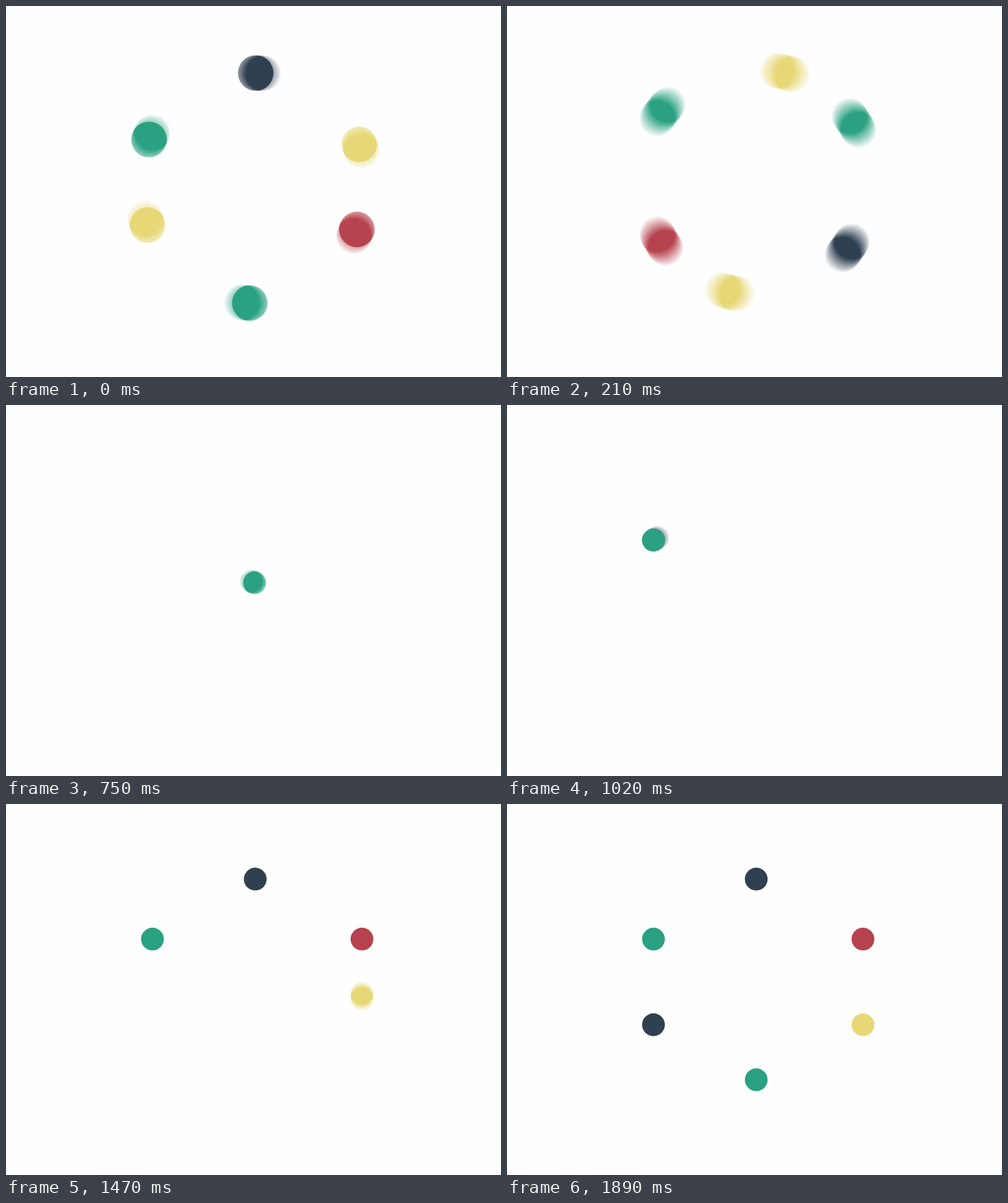
Write an HTML page with a canvas that moves like this. It is 800 by 600 pixels and loops after 3.12 s.

```html
<!DOCTYPE html>
<html lang="en">
<head>
<meta charset="utf-8">
<title>Orbiting dots</title>
<style>
  html, body { margin: 0; width: 100%; height: 100%; overflow: hidden; background: #fefefe; }
  canvas { display: block; }
</style>
</head>
<body>
<canvas id="stage" width="800" height="600"></canvas>
<script>
const W = 800, H = 600;
const FRAME_MS = 30, FRAMES = 104;
const SAMPLES = 16, SHUTTER = 0.5; // motion blur, shutter centred on the frame

const NAVY = '#2f4051', GREEN = '#2aa181', YELLOW = '#e7d877', RED = '#b6434e';

const ctx = document.getElementById('stage').getContext('2d');
const layer = document.createElement('canvas');
layer.width = W;
layer.height = H;
const lctx = layer.getContext('2d');

// Ring of large dots: resting places after the spin, topmost first
const PIVOT = [403.2, 288.2], SPIN = 179 * Math.PI / 180;
const SPIN_END = 10, MERGE_START = 15, MERGE_END = 20;
const BIG = 28.7, SMALL = 18.4;
const ring = [
  [GREEN, 576.5, 357.5],
  [NAVY, 406, 468],
  [YELLOW, 236.5, 355.5],
  [RED, 238, 218],
  [GREEN, 409, 95.7],
  [YELLOW, 576.5, 219]
];

// Chain of small dots: each leaves the place where the one before stopped
const CENTER = [401.9, 287.4];
const stops = [CENTER, [236.7, 218.4], [402.8, 121.4], [575.3, 218.4],
  [575.3, 357], [402.8, 446], [236.7, 357]];
const chain = [
  [GREEN, 25, 31],
  [NAVY, 34, 39],
  [RED, 39, 45],
  [YELLOW, 45, 51],
  [GREEN, 51, 57],
  [NAVY, 57, 62]
];

const mix = (a, b, p) => a + (b - a) * p;
const progress = (t, from, to) => Math.min(1, Math.max(0, (t - from) / (to - from)));

function ringPose(x, y, t) {
  const a = SPIN * (progress(t, 0, SPIN_END) - 1);
  const dx = x - PIVOT[0], dy = y - PIVOT[1];
  const px = PIVOT[0] + dx * Math.cos(a) - dy * Math.sin(a);
  const py = PIVOT[1] + dx * Math.sin(a) + dy * Math.cos(a);
  const m = progress(t, MERGE_START, MERGE_END);
  return [mix(px, CENTER[0], m), mix(py, CENTER[1], m), mix(BIG, SMALL, m)];
}

function chainPose(i, t) {
  const [, from, to] = chain[i];
  const p = progress(t, from, to);
  const a = stops[i], b = stops[i + 1];
  return [mix(a[0], b[0], p), mix(a[1], b[1], p), SMALL];
}

function disc(c, [x, y, r]) {
  c.beginPath();
  c.arc(x, y, r, 0, Math.PI * 2);
  c.fill();
}

function drawDot(color, frame, poseAt) {
  const poses = Array.from({ length: SAMPLES },
    (_, i) => poseAt(frame + SHUTTER * (i / SAMPLES - 0.5)));
  const [first, last] = [poses[0], poses[SAMPLES - 1]];
  if (first.every((v, i) => v === last[i])) {
    ctx.fillStyle = color;
    disc(ctx, first);
    return;
  }
  // Add up coverage first, then tint it, so that the colour stays exact
  lctx.globalCompositeOperation = 'source-over';
  lctx.clearRect(0, 0, W, H);
  lctx.globalCompositeOperation = 'lighter';
  lctx.fillStyle = `rgba(0, 0, 0, ${16 / 255})`;
  poses.forEach(pose => disc(lctx, pose));
  lctx.globalCompositeOperation = 'source-in';
  lctx.fillStyle = color;
  lctx.fillRect(0, 0, W, H);
  ctx.drawImage(layer, 0, 0);
}

function draw(frame) {
  ctx.fillStyle = '#fefefe';
  ctx.fillRect(0, 0, W, H);
  if (frame <= MERGE_END) {
    for (const [color, x, y] of [...ring].reverse()) {
      drawDot(color, frame, t => ringPose(x, y, t));
    }
    return;
  }
  for (let i = chain.length - 1; i >= 0; i--) {
    if (i === 0 || frame >= chain[i][1]) {
      drawDot(chain[i][0], frame, t => chainPose(i, t));
    }
  }
}

let shown = -1;
function tick() {
  const frame = Math.floor((performance.now() + 0.5) / FRAME_MS) % FRAMES;
  if (frame !== shown) {
    draw(frame);
    shown = frame;
  }
  requestAnimationFrame(tick);
}
tick();
</script>
</body>
</html>
```
